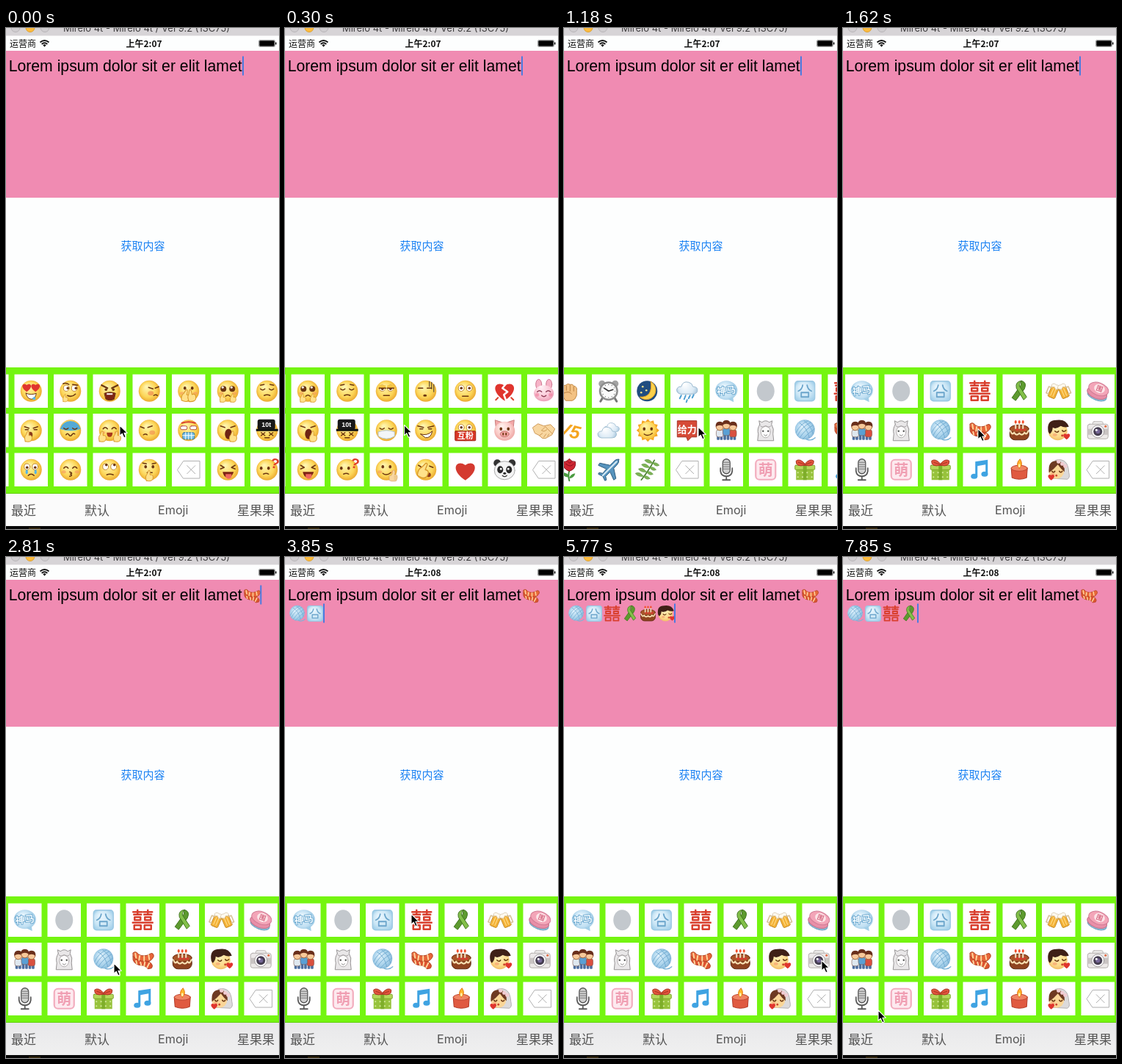
An HTML page with a canvas that plays this animation: 372x682 px, repeating every 8000 ms.

```html
<!DOCTYPE html>
<html lang="zh">
<head>
<meta charset="utf-8">
<title>Emoji keyboard</title>
<style>
html, body { margin: 0; width: 372px; height: 682px; overflow: hidden; background: #fff; }
canvas { display: block; width: 372px; height: 682px; }
</style>
</head>
<body>
<canvas id="stage"></canvas>
<script>
const W = 372, H = 682, LOOP = 8000;
const cv = document.getElementById('stage');
const dpr = window.devicePixelRatio || 1;
cv.width = W * dpr;
cv.height = H * dpr;
const g = cv.getContext('2d');
const CJK = '"Noto Sans CJK SC", "Noto Sans CJK", sans-serif';
const BR = '#6b3510', SKIN = '#f8d6a0', EDGE = '#cf9a58', RED = '#d9402f';

// ---- drawing helpers
function p(d, fill, stroke, w = 1) {
  const path = new Path2D(d);
  if (fill) { g.fillStyle = fill; g.fill(path); }
  if (stroke) { g.strokeStyle = stroke; g.lineWidth = w; g.stroke(path); }
}
const s = (d, w = 1.5, col = BR) => p(d, null, col, w);
function c(x, y, r, fill, ry = r, stroke) {
  g.beginPath();
  g.ellipse(x, y, r, ry, 0, 0, 7);
  if (fill) { g.fillStyle = fill; g.fill(); }
  if (stroke) { g.strokeStyle = stroke; g.lineWidth = 1; g.stroke(); }
}
function box(x, y, w, h, fill) { g.fillStyle = fill; g.fillRect(x, y, w, h); }
function rr(x, y, w, h, r, fill, stroke, lw = 1) {
  g.beginPath();
  g.roundRect(x, y, w, h, r);
  if (fill) { g.fillStyle = fill; g.fill(); }
  if (stroke) { g.strokeStyle = stroke; g.lineWidth = lw; g.stroke(); }
}
function at(x, y, k, fn, rot = 0) {
  g.save();
  g.translate(x, y);
  g.rotate(rot);
  g.scale(k, k);
  fn();
  g.restore();
}
function txt(str, x, y, font, fill, align = 'left') {
  g.font = font;
  g.fillStyle = fill;
  g.textAlign = align;
  g.fillText(str, x, y);
}
const glyph = (str, y, size, fill, x = 0) => txt(str, x, y, `bold ${size}px ${CJK}`, fill, 'center');
function shade(lo, mid, hi, r = 16) {
  const q = g.createRadialGradient(-4, -6, 1, 0, 0, r);
  q.addColorStop(0, hi); q.addColorStop(0.65, mid); q.addColorStop(1, lo);
  return q;
}

// ---- face parts
const ball = () => c(0, 0, 14.5, shade('#e79f28', '#fcd557', '#fff5b0'));
const face = fn => () => { ball(); fn(); };
const heart = (x, y, k, col = '#e0352e') => at(x, y, k, () =>
  p('M0 11C-18-1-10-13 0-6C10-13 18-1 0 11Z', col));
const eyes = (y = -3, dx = 0) => { c(-5 + dx, y, 1.8, BR, 2.3); c(5 + dx, y, 1.8, BR, 2.3); };
const bigEyes = (px, py) => [-5.5, 5.5].forEach(x => {
  c(x, -4, 4, '#fff', 4.2, '#c58a2c');
  c(x + px, -4 + py, 1.8, BR);
});
const joy = () => s('M-9-2Q-6-6-3-2M3-2Q6-6 9-2');
const shut = () => s('M-9-3Q-6 0-3-3M3-3Q6 0 9-3');
const smile = () => s('M-5 5Q0 9 6 4');
const blush = () => { c(-9, 3, 3, '#f4916088', 2); c(9, 3, 3, '#f4916088', 2); };
const tears = () => { c(-6, 3, 1.6, '#54b4ea', 3); c(6, 3, 1.6, '#54b4ea', 3); };
const fingers = (x, y, k = 1, rot = 0) => at(x, y, k, () =>
  p('M-4 6Q-6 0-3-3L-1-8Q1-9 1-6V-2Q6-3 5 3Q4 8-4 6Z', '#ffe18a', '#d99a2d'), rot);

// ---- hands
const thumb = (rot, k = 1) => () => at(0, 0, k, () => {
  p('M-9 0H-5Q-1-4-1-12Q1-15 4-12Q6-8 4-2H8Q11-1 10 2Q12 4 10 6Q11 9 9 10Q9 14 5 14H-4L-9 12Z', SKIN, EDGE);
  s('M3 2H9M3 6H9M3 10H8', 0.9, EDGE);
}, rot);
const victory = () => {
  p('M-5 2L-9-10Q-8-14-5-12L-1-2L4-12Q8-14 9-10L5 1Q9 4 6 10Q3 15-3 14Q-9 11-7 5Z', SKIN, EDGE);
  s('M-5 4Q0 1 3 5M-1 8Q3 6 5 8', 1, EDGE);
};
const fist = () => {
  p('M-9-3Q-9-8-5-8Q-2-11 1-9Q5-10 6-7Q11-6 10-1V6Q8 12 4 13H-5Q-9 9-9 3Z', '#f3c283', '#c28b48');
  s('M-4-7V-1M1-8V0M6-6V0M-8 3Q0-1 3 4', 1, '#b98041');
};
const palms = () => {
  p('M-13 9L-2-13Q1-14 1-10L-2 0L5 11L0 13L-4 8L-9 13Z', SKIN, EDGE);
  p('M-1-2L10 7Q14 10 13 13H3L-3 5Z', SKIN, EDGE);
};
const shake = () => {
  p('M-15-4L-8-9L0-6L9-8L15-2L11 6L2 11Q-3 12-6 7L-12 4Z', SKIN, EDGE);
  s('M-3 0L2-5L12 5M-3 0Q0 3 4-1M-6 7L-2 4M0 9L3 5M5 8L7 5', 1, EDGE);
};

const del = () => {
  s('M-15 0L-7-11.8H15.3V11.8H-7Z', 1, '#b0b0b0');
  s('M-2-5.5L9 5.5M9-5.5L-2 5.5', 1, '#b0b0b0');
};
const cloud = (y = 0) => at(0, y, 1, () =>
  p('M-9 8Q-15 7-14 1Q-12-3-8-2Q-6-10 2-8Q7-7 8-2Q15-2 14 4Q13 8 8 8Z', shade('#9ebfd8', '#dbeaf5', '#fff'), '#9dbbd0'));

// ---- last page
const bubble = () => {
  c(0, -1, 15, shade('#93c4e2', '#c3e1f3', '#edf8ff'), 13);
  p('M2 11L10 15L9 8Z', '#a3cfe8');
  at(0, 0, 1, () => {
    g.font = `bold 13px ${CJK}`; g.textAlign = 'center';
    g.strokeStyle = '#5c9fc9'; g.lineWidth = 1.6; g.strokeText('神马', 0, 4);
    g.fillStyle = '#f4fbff'; g.fillText('神马', 0, 4);
  }, -0.12);
};
const people = () => [[-9, -5, '#dfe8f0'], [9, -5, '#d9503f'], [0, -7, '#5a9fd4']].forEach(([x, y, col]) => {
  rr(x - 4, 6, 3.6, 7, 1, '#4b6da0'); rr(x + 0.4, 6, 3.6, 7, 1, '#4b6da0');
  rr(x - 4.8, y + 4, 9.6, 10, 3, col, '#7d5a50', 0.6);
  c(x, y, 5, '#f6c99a', 5, '#a8683e');
  p(`M${x - 5.5} ${y}Q${x - 6} ${y - 7} ${x} ${y - 7}Q${x + 6} ${y - 7} ${x + 5.5} ${y}Q${x} ${y - 4} ${x - 5.5} ${y}Z`, '#6a2f1b');
});
const mic = () => {
  s('M-8-2V2Q-7 9 0 9Q7 9 8 2V-2M0 9V13.5M-5 14H5', 1.8, '#5a5a5a');
  rr(-5, -14.5, 10, 20, 5, '#d2d2d2', '#555', 1.3);
  s('M-4-10H4M-4-7H4M-4-4H4M-4-1H4', 1.1, '#777');
};
const hero = () => c(0, 0, 12, '#c3c8cd', 14);
const alpaca = () => {
  p('M-8-8L-9-13L-5-11Q0-15 5-11L9-13L8-8Q12-2 10 5L11 14H-11L-10 5Q-12-2-8-8Z', '#e9e7e8', '#969394');
  c(0, 2, 6.5, '#fdfcfc', 8, '#b5b1b2');
  c(-3.5, 1, 1.2, '#555'); c(3.5, 1, 1.2, '#555');
  s('M-2 6L0 7.5L2 6', 1, '#888'); s('M-7-6Q-4-3 0-6Q4-3 7-6', 1, '#a09c9d');
};
const cute = () => { rr(-13.5, -13.5, 27, 27, 5, '#fdeaef', '#f2adbe', 2.2); glyph('萌', 7.5, 20, '#f09fb3'); };
const frown = () => {
  rr(-13.5, -13.5, 27, 27, 4, shade('#a3d0ea', '#cbe6f5', '#eaf7ff'), '#9ac7e2', 1.3);
  s('M-3-8Q-4-2-9 0M3-8Q4-2 9 0M-5 2H5V8H-5Z', 1.8, '#6ba5cb');
};
const yarn = () => {
  c(0, -1, 13.5, shade('#6fa6cd', '#a5d0ea', '#dff1fb'));
  s('M-12 3Q-7-8 4-13M-10 7Q-4-5 8-11M-7 10Q0-1 11-7M-3 12Q4 4 13-2M-7-10Q3-4 6 10M-1-13Q9-6 11 5', 0.9, '#6fa9d0');
  s('M2 12Q9 15 14 10', 1.4, '#7db4d8');
};
const gift = () => {
  box(-12, -2, 24, 16, '#97c23c'); rr(-13.5, -6, 27, 6, 1, '#b4d85a', '#7fa62c');
  box(-2.5, -6, 5, 20, '#7fae2a');
  for (let i = 0; i < 8; i++) c(-9.5 + (i % 4) * 6.3, 4 + (i >> 2) * 6, 1.1, '#d5eb9c');
  p('M0-6Q-13-3-12-12Q-7-16 0-8Q7-16 12-12Q13-3 0-6Z', '#e2553d', '#a83423');
  s('M-9-10L0-7L9-10', 1, '#a83423');
};
const joyRed = () => [-7, 7].forEach(x => at(x, 0, 1, () =>
  s('M-6-11H6M0-13.5V-7.5M-5-7.5H5M-4-4H4V0H-4ZM-6.5 3.5H6.5M-4.5 7H4.5V12.5H-4.5Z', 2.5, RED)));
const scarf = () => {
  p('M-13-9Q-9-12-6-7Q2-2 11-8Q15-9 15-4Q12 4 1 4Q-10 2-13-4Z', '#e8673a', '#b04423');
  p('M-13-4Q-6 4 4 2L10 4Q15 8 12 12L7 13Q4 8-3 8Q-11 7-13 1Z', '#dd5430', '#b04423');
  s('M-10-8L-9-2M-4-5L-5 1M2-4L2 2M8-6L9 0M-9 2L-8 6M-3 4L-2 8M3 4L2 9M9 5L6 11', 1.9, '#ffd9a0');
};
const music = () => {
  p('M-6-11L11-13.5V6H8V-7L-3-5V9H-6Z', '#3fa3e2');
  c(-7.5, 9, 4.5, '#3fa3e2', 3.6); c(6.7, 6, 4.5, '#3fa3e2', 3.6);
};
const ribbon = () => {
  p('M3-14Q11-12 7-3L-5 13L-10 9L2-8Z', '#5d9a2f', '#41751f');
  p('M3-14Q-6-13-4-4L6 12L10 8L0-7Q0-12 3-14Z', '#83c04a', '#41751f');
};
const cake = () => {
  rr(-13, -3, 26, 16, 7, '#8f4420', '#5d2812');
  c(0, -2, 13, '#a9552a', 5.5, '#6b3015');
  s('M-12 1Q-10 7-7 3Q-4 8 0 4Q4 8 7 3Q10 7 12 1', 2.2, '#f7e0b2');
  [-5, 0, 5].forEach(x => { box(x - 1, -10, 2, 8, '#f6e3c8'); c(x, -11.5, 1.5, '#f3502c', 2.2); c(x + 2, -1, 2, '#dc3a32', 1.5); });
};
const candle = () => {
  p('M-11-2L-10 11Q0 15 10 11L11-2Z', '#e05a41', '#b43b28');
  c(0, -2, 11, '#ef8464', 4, '#c14631');
  p('M0-2Q-6-8 1-14.5Q6-7 0-2Z', '#fdb52a', '#e67619'); c(0, -5.5, 1.5, '#fff0a8', 2.5);
};
const mug = () => {
  rr(-6, -10, 12, 20, 2, '#f3b136', '#c28a2c'); s('M6-5H10V6H6', 2, '#d9c49c');
  s('M-2-5V7M2-5V7', 1.4, '#ffdc86');
  p('M-7-9Q-5-14 0-12Q6-14 7-9L5-6L2-8L-2-5Z', '#fffaf0', '#d9ccb2');
};
const beer = () => { at(-7, 1, 0.85, () => { g.scale(-1, 1); mug(); }, 0.4); at(7, 1, 0.85, mug, -0.4); };
const kiss = () => {
  c(-1, 1, 13, shade('#eeb055', '#fcd98a', '#fff0bd'), 12.5);
  p('M-14 2Q-17-14-3-14Q10-16 14-5Q8-3 3-6Q-4-1-8-4Q-8 1-12 5Z', '#3f2017');
  s('M-5 1Q-2 4 0 1M5 0Q7 3 10 0'); c(-5, 6, 3, '#f3906888', 2); c(5, 7, 1.6, '#c94a2e'); heart(11, 8, 0.42);
};
const bride = () => {
  p('M-4-13Q13-17 14 4Q16 11 12 13L-8 12Z', '#dcdadb', '#b5b1b3');
  c(-3, 2, 10.5, '#fad698', 10.5);
  p('M-13 4Q-15-12-3-12Q9-12 8 3Q3-1-1-7Q-6-1-13 4Z', '#6e3a22');
  s('M-9 2Q-7 5-5 2M1 2Q3 5 5 2'); c(-8, 6, 2.5, '#f3906888', 2); c(-3, 8, 1.4, '#c94a2e');
  [0, 5, 9].forEach((x, i) => c(x, -11 + i * 3, 2.6, '#f1ccd3')); heart(-10, 10, 0.4);
};
const knit = () => at(0, 0, 1, () => {
  c(1, 6, 13.5, '#8cc3de', 6.5, '#6a9fbd'); c(0, 3, 14, '#e88fa8', 7.5, '#c56e88');
  c(0, -3, 14, '#f3a5b8', 8.5, '#d17d95'); c(1, -4, 7.5, '#fce4e8', 6);
  glyph('围', -0.5, 9, '#d76a83', 1);
}, 0.35);
const camera = () => {
  rr(-7, -12, 14, 8, 2, '#efedec', '#bbb6b4'); rr(-14, -8.5, 28, 20, 3, '#ece9e8', '#b5b0ae');
  box(-14, -2, 28, 8, '#c9c4c3'); c(10.5, -5.5, 1.5, '#e26a43');
  c(0, 1.5, 8.5, '#fbfafa', 8.5, '#a39ea1'); c(0, 1.5, 6, '#453d50'); c(0, 1.5, 3, '#766797'); c(-2, -0.5, 1.5, '#fff');
};

// ---- columns of three, seven to a page
const page1 = [[], [],
  [face(() => { heart(-6, -5, 0.55); heart(6, -5, 0.55); p('M-7 3Q0 6 7 3Q6 11 0 11Q-6 10-7 3Z', '#fff', BR); c(4, 10, 2, '#58b4e6'); }),
   face(() => { s('M-9-5L-3-3M3-3L9-5M-8-1H-4M4-1H8'); c(-1, 6, 3, '#8c3a1b', 4); fingers(-4, 9); }),
   face(() => { bigEyes(0, 1); s('M-4 8Q0 4 4 8'); tears(); })],
  [face(() => { bigEyes(2, 0); s('M-10-10Q-6-12-2-9M3-9L10-8M-4 6Q2 9 7 4'); fingers(-7, 10, 0.7); }),
   () => { ball(); p('M-14-2A14.5 14.5 0 0 1 14-2Q0 3-14-2Z', '#53a9d5'); shut(); s('M-6 6Q-4 3-2 6T2 6T6 5'); },
   face(() => { joy(); blush(); s('M-1 3Q4 5 0 6Q4 8-1 9'); })],
  [face(() => { s('M-11-8L-3-4M11-8L3-4', 2.2); c(-5, -2, 1.8, BR); c(5, -2, 1.8, BR); p('M-7 3Q0 0 8 3L6 11Q0 14-5 11Z', '#7d2414', BR); box(-4, 3, 8, 2, '#fff'); }),
   face(() => { joy(); blush(); p('M-4 3H4Q4 9 0 9Q-4 9-4 3Z', '#a8371d'); fingers(-10, 9); fingers(10, 9); }),
   face(() => { bigEyes(1, -2.5); s('M-4 7Q0 5 5 7'); })],
  [face(() => { s('M-1-5L5-3M8-4L13-6'); c(2, 3, 4, '#ef7d4a99', 3); s('M6 6Q9 4 11 6'); }),
   face(() => { s('M-12-5L-7-3M-2-4L4-6M-8 6Q-5 4-3 6'); c(4, 3, 4, '#ef7d4a88', 3); }),
   face(() => { eyes(-4); s('M-9-9L-4-8M4-8L9-9M-3 4H4'); fingers(0, 9); })],
  [face(() => { eyes(-4); blush(); fingers(-4, 7, 1.1, 0.2); fingers(4, 7, 1.1, -0.2); }),
   face(() => { rr(-11, -6, 9, 5, 2, '#fff', '#b34b39'); rr(2, -6, 9, 5, 2, '#fff', '#b34b39'); s('M-9-10Q0-13 9-10', 2, RED); rr(-8, 3, 16, 9, 2, '#73bde5', '#35799f'); s('M-4 3V12M0 3V12M4 3V12M-8 7H8', 1, '#fff'); }),
   del]];
const page2 = [
  [face(() => { c(-6, -3, 4, BR); c(6, -3, 4, BR); c(-7, -5, 1.5, '#fff'); c(5, -5, 1.5, '#fff'); blush(); s('M-3 7Q0 4 3 7'); fingers(-7, 10, 0.8); fingers(7, 10, 0.8); }),
   face(() => { s('M-10-6L-4-4M4-4L10-6'); c(1, 5, 5, '#6e2413', 7); fingers(7, 9); }),
   face(() => { s('M-10-6L-5-3L-10-1M10-6L5-3L10-1'); p('M-7 3H8Q6 10 0 11Q-6 10-7 3Z', '#7d2414'); p('M-3 6H5V10Q1 15-3 10Z', '#f0655e'); })],
  [face(() => { shut(); s('M-9-8L-4-9M4-9L9-8M-4 6Q0 4 4 6'); }),
   () => { ball(); rr(-13, -15, 24, 14, 3, '#181818'); box(-15, -2, 30, 3, '#111'); txt('10t', -1, -5, 'bold 9px "Liberation Sans", sans-serif', '#fff', 'center'); s('M-8 3L-3 7M-3 3L-8 7M3 3L8 7M8 3L3 7M-3 10H3'); },
   face(() => { eyes(-2, -3); s('M-5 6Q-1 4 2 6'); at(10, -5, 1, () => txt('?', 0, 3, 'bold 19px "Liberation Sans", sans-serif', '#e03c28', 'center'), 0.2); })],
  [face(() => { bigEyes(0, 1); p('M-10-8H-1V-4H-10ZM1-8H10V-4H1Z', '#f6c846'); s('M-10-4H-1M1-4H10M-4 6H4'); }),
   face(() => { shut(); p('M-11 2Q0-2 11 2V8Q0 15-11 8Z', '#f3f6f7', '#b5c2c8'); }),
   face(() => { eyes(-4); smile(); blush(); at(9, 8, 0.55, thumb(0)); })],
  [face(() => { s('M-10-4H-4M2-4H8'); c(-1, 6, 2.5, BR, 1.5); s('M5-13V-6M8-12V-3M11-9V1', 1, '#41352e'); }),
   face(() => { s('M-11-6L-3-4M3-4L11-6M-8-2H-4M4-2H8'); p('M-7 5Q2 8 9 1Q7 11 0 10Z', '#fff', BR); }),
   face(() => { s('M-10-6L-5-3M5-5L10-3'); c(4, 7, 3, '#8c3a1b'); fingers(-3, 2, 1.4, 0.4); })],
  [face(() => { bigEyes(0, 0); s('M-4 7H4'); }),
   face(() => { bigEyes(0, 0); rr(-14, 1, 28, 13, 1, '#d93626', '#9c2015'); glyph('互粉', 11.5, 11, '#fff'); }),
   () => heart(0, 1, 1.22, '#d43a30')],
  [() => { heart(0, 0, 1.2); s('M2-10L-3-4L4 1L-1 5L2 13', 2.5, '#fff'); s('M-9 9L-12 12M9 9L12 12', 2, RED); },
   () => { p('M-12-5L-13-14L-4-11ZM12-5L13-14L4-11Z', '#f3a8a8', '#c97e7c'); c(0, 1, 14, shade('#e99e9c', '#fac9c5', '#fff0ec'), 13); eyes(-2); c(0, 5, 6, '#f0a09d', 4, '#c77773'); c(-2, 5, 1, BR, 2); c(2, 5, 1, BR, 2); },
   () => { c(-10, -9, 5, '#333'); c(10, -9, 5, '#333'); c(0, 1, 14, '#f4f4f4', 12.5, '#aaa'); c(-6, 0, 4, '#292929', 5); c(6, 0, 4, '#292929', 5); c(-5, -1, 1.4, '#fff'); c(5, -1, 1.4, '#fff'); c(0, 5, 2, '#222', 1.5); s('M-3 8Q0 11 3 8', 1.2, '#333'); }],
  [() => { c(-7, -9, 4, '#f6b3c7', 7, '#cf7891'); c(7, -9, 4, '#f6b3c7', 7, '#cf7891'); c(0, 3, 13.5, shade('#e793ae', '#fac6d5', '#fff0f5'), 11); s('M-9 1Q-6-2-3 1M3 1Q6-2 9 1M-3 6Q0 9 3 6', 1.4, '#8f3d56'); c(-9, 5, 2.5, '#f0759688'); c(9, 5, 2.5, '#f0759688'); },
   shake, del]];
const page3 = [
  [palms, thumb(0), victory],
  [thumb(-0.6), thumb(Math.PI), fist],
  [fist, thumb(Math.PI / 2), palms],
  [fist,
   () => at(0, 0, 1, () => txt('V5', 0, 9, 'bold italic 25px "Liberation Sans", sans-serif', '#f5a51f', 'center'), 0.25),
   () => { s('M0 1Q-2 8 0 15', 2, '#3d8b37'); p('M0 10Q-8 11-9 4Q-2 4 0 10ZM0 12Q7 11 8 5Q1 6 0 12Z', '#4c9c42'); p('M-8-11Q-4-10 0-15Q4-10 8-11Q10-1 0 2Q-10-1-8-11Z', '#cf2632', '#89121e'); s('M-5-8Q2-2 6-8M-2-11Q1-7 3-11', 1, '#89121e'); }],
  [() => { c(-9, -10, 4.5, '#a3a3a3'); c(9, -10, 4.5, '#a3a3a3'); s('M-8 9L-11 14M8 9L11 14', 3, '#777'); c(0, 0, 13, '#8d8d8d'); c(0, 0, 10.5, '#fafafa'); s('M-6-4L0 0L6-2', 1.6, '#333'); for (let i = 0; i < 12; i++) c(8.8 * Math.cos(i * Math.PI / 6), 8.8 * Math.sin(i * Math.PI / 6), 0.6, '#555'); },
   () => { at(4, -4, 0.75, () => cloud()); at(-2, 3, 0.9, () => cloud()); },
   () => { p('M14-14Q10-15 6-10L2-6L-12-9L-14-6L-3-1L-8 5L-13 4L-14 6L-8 9L-5 15L-3 14L-4 9L2 3L7 14L10 12L7-2L11-6Q15-10 14-14Z', '#5794be', '#315f80'); s('M11-11L-8 8', 2, '#d8eaf4'); }],
  [() => { c(-1, 0, 14, '#204d80', 14); p('M4-13A13 13 0 1 1-11 8Q7 9 4-13Z', '#fbd04b', '#dc9b25'); [[-7, -6], [-2, -1], [-9, 2]].forEach(([x, y]) => c(x, y, 1.3, '#ffe58a')); },
   () => { for (let i = 0; i < 12; i++) at(0, 0, 1, () => p('M-4-11L0-15.5L4-11Z', '#f6a623'), i * Math.PI / 6); c(0, 0, 12, shade('#efa129', '#fdd252', '#fff3a5')); eyes(-2); smile(); },
   () => { s('M-9 14Q0 3 9-13', 1.6, '#4b8130'); for (let i = 0; i < 4; i++) at(-6 + i * 4.2, 9 - i * 6, 1, () => p('M0 0Q-5-7-11-4Q-8 1 0 0ZM0 0Q5-2 9 3Q4 6 0 0Z', '#7fb455', '#5b9340', 0.6)); }],
  [() => { cloud(-4); s('M-8 6L-10 10M-2 6L-4 11M4 6L2 10M9 5L7 9M0 12L-1 15', 2, '#4e9fd2'); },
   () => { p('M-13-13H13V9H6L1 14L-1 9H-13Z', '#d64a37', '#a22e20'); glyph('给力', 3, 13, '#fff'); },
   del]];
const page4 = [[bubble, people, mic], [hero, alpaca, cute], [frown, yarn, gift], [joyRed, scarf, music],
  [ribbon, cake, candle], [beer, kiss, bride], [knit, camera, del]];
const cols = [...page1, ...page2, ...page3, ...page4];

// ---- timeline
const PAGE = 375, PITCH = PAGE / 7;
const ease = u => { u = Math.min(1, Math.max(0, u)); return u * u * (3 - 2 * u); };
const scrollAt = t => 3 * PAGE - [-168, 442, 942].reduce((a, b) => a + PAGE * ease((t - b) / 500), 0);
const edits = [[2505, scarf], [3105, yarn], [3545, frown], [3990, joyRed], [4430, ribbon], [4875, cake],
  [5320, kiss], [6060, camera], [6650], [7100], [7545]];
const path = [[0, 155, 541], [592, 170, 540], [1185, 183, 543], [2000, 186, 552], [2360, 186, 572], [2518, 182, 552],
  [2814, 147, 553], [3110, 134, 549], [3400, 133, 510], [3550, 136, 489], [3851, 172, 486], [4000, 184, 489],
  [4440, 240, 491], [4580, 245, 500], [4880, 238, 546], [5320, 291, 548], [5776, 351, 549], [6070, 351, 549],
  [6520, 347, 600], [7553, 347, 600], [7849, 48, 617], [8000, 48, 617]];
function pointer(t) {
  const i = Math.max(1, path.findIndex(k => k[0] >= t));
  const [t0, x0, y0] = path[i - 1], [t1, x1, y1] = path[i];
  const u = ease((t - t0) / (t1 - t0));
  return [x0 + (x1 - x0) * u, y0 + (y1 - y0) * u];
}

// ---- screen
function chrome(t) {
  box(0, 0, W, H, '#fdfefe');
  box(0, 0, W, 10, '#d7d4d7');
  box(0, 10, W, 1, '#e9e8e9');
  c(13, -0.5, 6, '#d0cdd0', 6, '#b8b5b8');
  c(33, -0.5, 6, '#fdbc40', 6, '#dda133');
  c(53, -0.5, 6, '#d0cdd0', 6, '#b8b5b8');
  txt('Mirelo 4t - Mirelo 4t / Vel 9.2 (13C75)', 191.5, 5, '13px Inter, sans-serif', '#3f3d3f', 'center');
  txt('运营商', 5, 25.5, `12px ${CJK}`, '#111');
  g.lineCap = 'butt';
  s('M46.5 19.5Q52.5 14.5 58.5 19.5', 1.8, '#111');
  s('M48.7 22Q52.5 18.6 56.3 22', 1.8, '#111');
  p('M50.3 23.2Q52.5 21.5 54.7 23.2L52.5 25.8Z', '#111');
  txt(t < 3250 ? '上午2:07' : '上午2:08', 188, 25.5, `bold 12px ${CJK}`, '#111', 'center');
  rr(344.5, 16.5, 22, 9, 1.5, null, '#666', 0.6);
  rr(345.3, 17.3, 20.4, 7.4, 1, '#000');
  box(367, 19.5, 1.5, 3, '#111');
  box(0, 31, W, 200, '#f08bb2');
  txt('获取内容', 186.5, 302, `15px ${CJK}`, '#1b82f3', 'center');
}
function editor(t) {
  txt('Lorem ipsum dolor sit er elit lamet', 3.7, 59, '21.2px "Liberation Sans", Arial, sans-serif', '#000');
  const line = [];
  let last = 0;
  for (const [when, icon] of edits) {
    if (t < when) break;
    last = when;
    icon ? line.push(icon) : line.pop();
  }
  line.forEach((icon, i) => i ? at(-8 + 24.5 * i, 77, 0.77, icon) : at(335, 52, 0.77, icon));
  if ((t - last) % 1000 < 550) {
    const n = line.length;
    if (n < 2) box(n ? 346.3 : 322, 38.5, 2, 26, '#4b7be0');
    else box(3 + 24.5 * (n - 1), 63.5, 2, 26, '#4b7be0');
  }
}
// cells sit on half pixels, as on a 2x screen
const half = v => Math.round(v * 2) / 2;
function keyboard(t) {
  box(0, 462, W, 172, '#74f510');
  const off = scrollAt(t);
  cols.forEach((col, i) => {
    const x = half(3 + (i - 21) * PITCH + off);
    if (x < -46 || x > W) return;
    for (let r = 0; r < 3; r++) {
      const y = half(471.6 + r * PITCH);
      box(x, y, 45.5, 45.5, '#fff');
      if (col[r]) at(x + 22.75, y + 22.75, 1, col[r]);
    }
  });
}
function toolbar(t) {
  if (t < 1900) box(0, 634, W, 44, '#fbfbfb');
  else {
    const q = g.createLinearGradient(0, 634, 0, 678);
    q.addColorStop(0, '#e8e8ea'); q.addColorStop(1, '#f0f0f0');
    box(0, 634, W, 44, q);
  }
  box(0, 633.5, W, 0.5, 'rgba(0,0,0,.3)');
  box(0, 678, W, 4, '#060606');
  box(31, 680, 16, 2, '#33270f');
  const f = `17px ${CJK}`, col = '#555';
  txt('最近', 7, 662.5, f, col);
  txt('默认', 107, 662.5, f, col);
  txt('Emoji', 207, 662, '16.2px Inter, sans-serif', col);
  txt('星果果', 315, 662.5, f, col);
}
function render(t) {
  g.setTransform(dpr, 0, 0, dpr, 0, 0);
  g.lineJoin = 'round';
  chrome(t);
  g.lineCap = 'round';
  editor(t);
  keyboard(t);
  toolbar(t);
  const [x, y] = pointer(t);
  at(x, y, 1, () => p('M0 0V14.2L3.3 11.2L5.8 16.8L8.3 15.7L5.9 10.3H10.4Z', '#000', '#fff', 1.1));
}

let shown = -1;
function tick() {
  const k = Math.floor((performance.now() % LOOP) / 147.5);
  if (k !== shown) {
    shown = k;
    render(k * 148.1);
  }
  requestAnimationFrame(tick);
}
tick();
</script>
</body>
</html>
```
